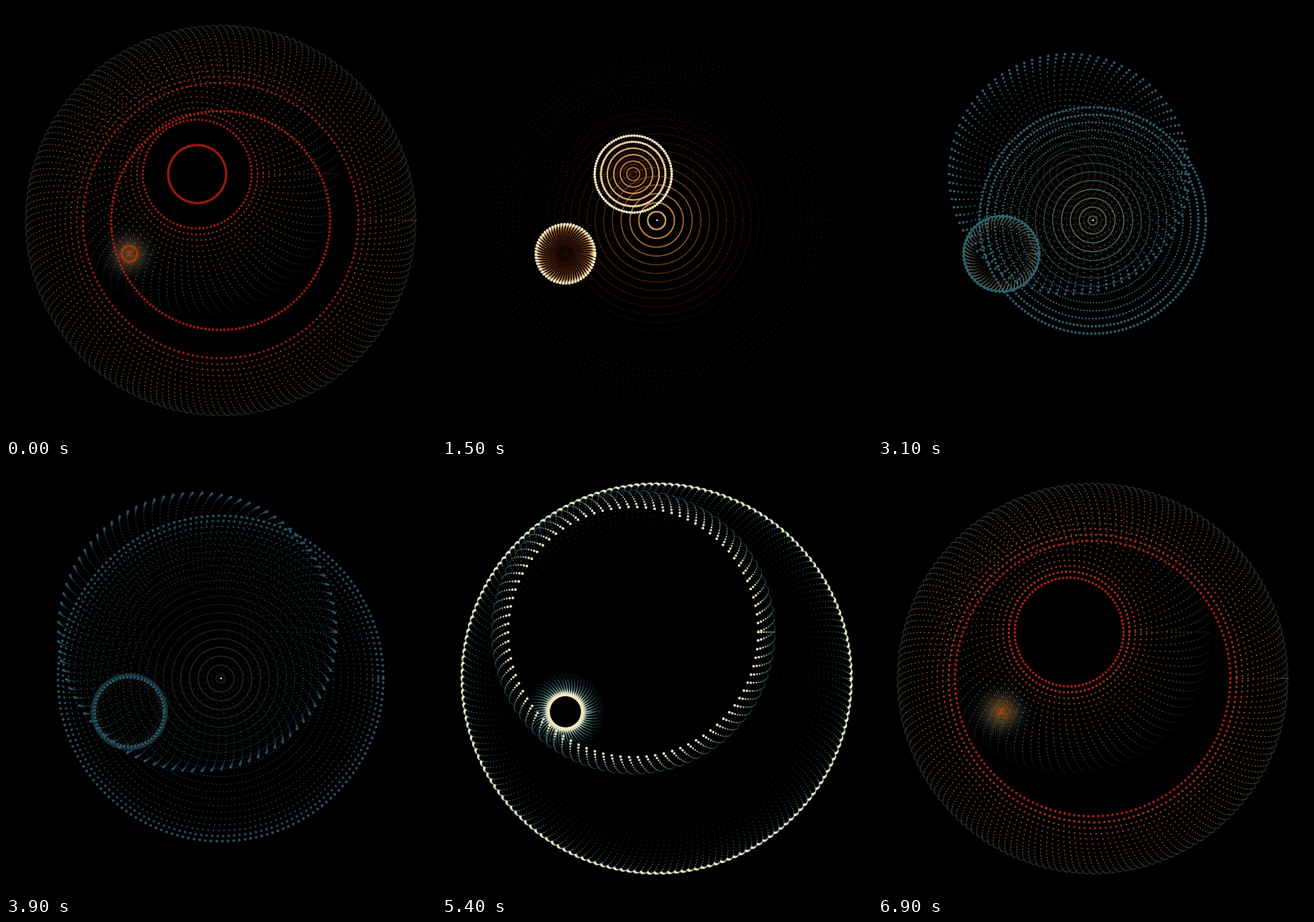
These frames come from a looping animation (600x600 px, 7 s). An HTML page with a canvas:

```html
<!DOCTYPE html>
<html lang="en">
<head>
<meta charset="utf-8">
<title>Dot rings</title>
<style>
  html, body { margin: 0; width: 100%; height: 100%; overflow: hidden; background: #000; }
  canvas { display: block; width: 600px; height: 600px; }
</style>
</head>
<body>
<canvas id="stage" width="600" height="600"></canvas>
<script>
const ctx = document.getElementById('stage').getContext('2d');
const TAU = Math.PI * 2;
const STEP = 100, STEPS = 70;
const CYCLE = 73.1, SPEED = 0.0458;
const TRAIL = 32;

const rings = [
  { x: 299.5, y: 299.3, size: 272.5, dots: 180, start: 17.5, spin: 0.006 },
  { x: 266.8, y: 234.5, size: 198, dots: 90, start: 9, spin: 0.009 },
  { x: 172.2, y: 345.7, size: 53, dots: 60, start: -4.6, spin: 0.012 }
];

const stops = [
  [0, '98180f'], [7, 'd4682a'], [11, 'ffa850'], [15, 'ffebc4'], [19, 'e8f0dc'],
  [22, '8cd0c6'], [24, '55aaa8'], [31, '2a5c6c'], [35, '1e4656'], [39, '285464'],
  [46, '55aaa8'], [48, '8ad2c6'], [52, 'e0f0da'], [55, 'ffe6b0'], [59, 'ffae50'],
  [64, 'e47a30'], [69, 'a01c10']
].map(([at, hex]) => ({ at, rgb: hex.match(/../g).map(h => parseInt(h, 16)) }));

const mod = (a, b) => ((a % b) + b) % b;

function colorAt(n) {
  const i = Math.max(1, stops.findIndex(s => s.at >= n));
  const a = stops[i - 1], b = stops[i];
  const p = (n - a.at) / (b.at - a.at);
  return a.rgb.map((v, c) => v + (b.rgb[c] - v) * p);
}

function shade(rgb, level) {
  return `rgb(${rgb.map(v => Math.round(v * level)).join(',')})`;
}

// Half a sine wave, then a short rest at the centre.
function radiusAt(ring, n) {
  const phase = mod(n - ring.start, CYCLE) * SPEED;
  return phase < Math.PI ? ring.size * Math.sin(phase) : 0;
}

function addDot(x, y, d) {
  if (d > 2.2) {
    ctx.moveTo(x + d / 2, y);
    ctx.arc(x, y, d / 2, 0, TAU);
  } else {
    ctx.rect(x - d / 2, y - d / 2, d, d);
  }
}

function drawRing(ring, n, age, rgb) {
  const r = radiusAt(ring, n);
  if (r < 0.5) return;
  const d = 1.5 + 2.3 / (1 + (age / 2) ** 3);
  ctx.fillStyle = shade(rgb, (1 - age / TRAIL) ** 2);
  ctx.beginPath();
  for (let i = 0; i < ring.dots; i++) {
    const a = i / ring.dots * TAU + n * ring.spin;
    addDot(ring.x + r * Math.cos(a), ring.y + r * Math.sin(a), d);
  }
  // Fixed seam dot on the horizontal axis.
  addDot(ring.x + r, ring.y, d);
  ctx.fill();
}

function draw(n) {
  ctx.globalCompositeOperation = 'source-over';
  ctx.fillStyle = '#000';
  ctx.fillRect(0, 0, 600, 600);
  ctx.globalCompositeOperation = 'lighten';
  for (let age = TRAIL - 1; age >= 0; age--) {
    const m = mod(n - age, STEPS);
    const rgb = colorAt(m);
    for (const ring of rings) drawRing(ring, m, age, rgb);
  }
  if (n >= 13 && n <= 43) {
    ctx.fillStyle = '#fff';
    ctx.fillRect(299, 298, 2, 2);
  }
}

const begin = performance.now();
let shown = -1;
function tick() {
  const n = Math.floor((performance.now() - begin) / STEP) % STEPS;
  if (n !== shown) draw(shown = n);
  requestAnimationFrame(tick);
}
tick();
</script>
</body>
</html>
```
